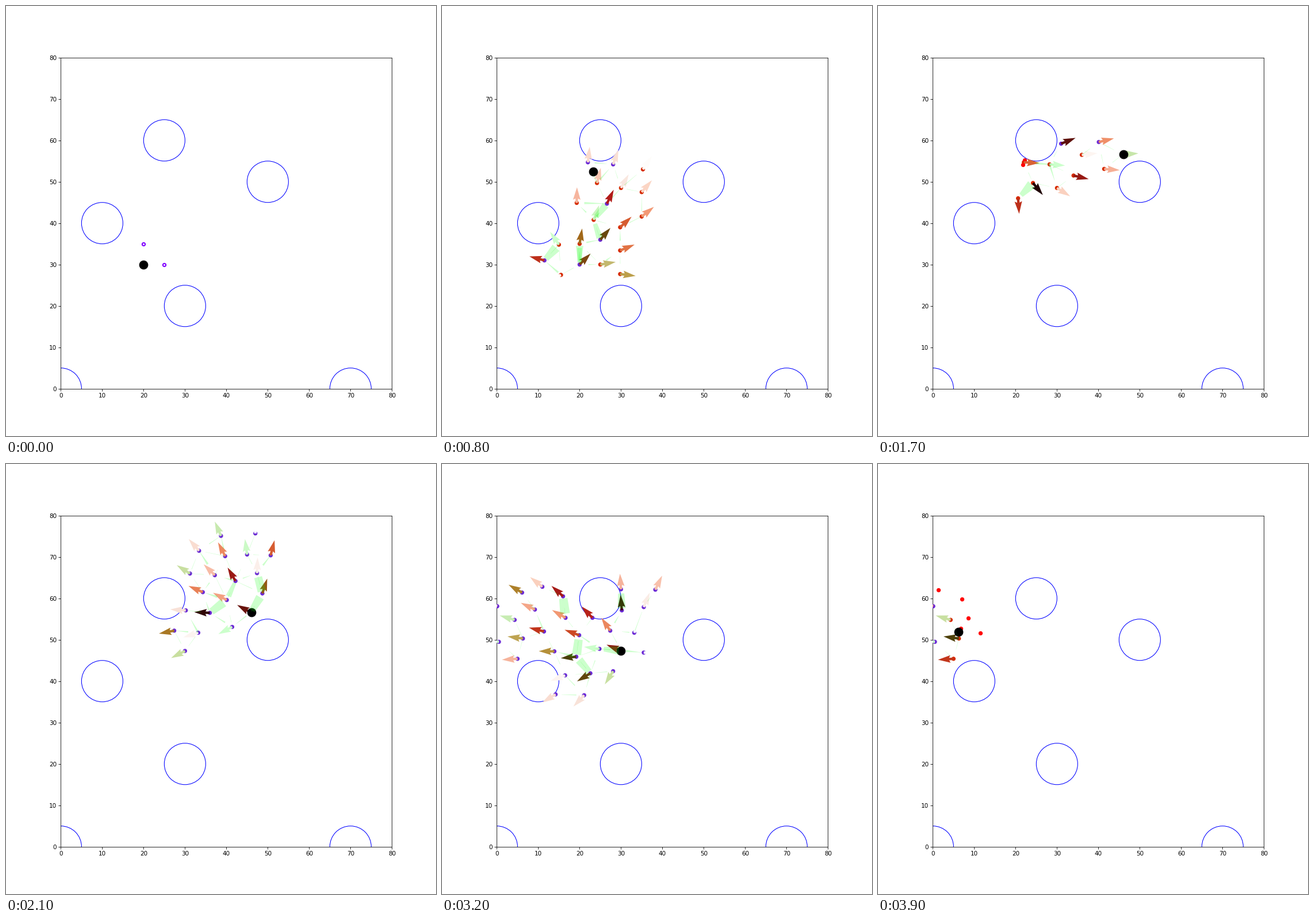
A matplotlib script that plays this animation: 748 by 748 pixels, repeating every 4 s.

```python
import itertools

import numpy as np
import matplotlib.pyplot as plt
from matplotlib.animation import FuncAnimation
from matplotlib.collections import PolyCollection
from matplotlib.colors import LinearSegmentedColormap

FRAMES, STEP = 40, 100
LIME = np.array([0, 1, 0])
HEAT = LinearSegmentedColormap.from_list("heat", [
    "#ffffff", "#f8e2d8", "#fbd5c4", "#f6b29a", "#f1946e", "#de6c3c",
    "#c63d1c", "#b01a18", "#84190f", "#540e0a", "#200404"])
RAINBOW = plt.get_cmap("rainbow")


def tint(color, amount):
    return (1 - amount) * np.array(color[:3]) + amount * LIME


def wedge(a, b, w0, w1):
    """Quadrilateral from a to b, w0 wide at its start and w1 at its end."""
    d = b - a
    n = np.array([-d[1], d[0]]) / np.hypot(*d) / 2
    return np.array([a + n * w0, b + n * w1, b - n * w1, a - n * w0])


def cooling(top, n):
    """Heat values falling from top to zero."""
    left = 1 - np.arange(n) / n
    return np.maximum(top * 1.08 * left ** 1.3 - .06, 0)


class Graph:
    """Nodes spread outwards from a root; the stay nodes outlive the leave nodes.

    Both lists run from hot to cold. Times: growth, fading, end of the rest.
    """

    def __init__(self, root, stay, leave, tops, times, gain, hue, seed):
        self.xy = np.vstack([stay, leave])
        n, self.keep = len(self.xy), len(stay)
        self.times, self.gain = times, gain
        self.counts = [0, n, n, self.keep, self.keep, 0]
        self.heat = np.r_[cooling(tops[0], len(stay)), cooling(tops[1], len(leave))]
        away = self.xy - root
        dist = np.hypot(*away.T)
        self.way = away / dist[:, None]
        self.order = np.argsort(dist)
        self.hue = hue(*self.xy.T, self.heat) * np.ones(n)
        rng = np.random.default_rng(seed)
        self.green = rng.random(n) < .3
        self.links = []
        for i, j in itertools.combinations(range(n), 2):
            start, size, width, chance = rng.random(4)
            if np.hypot(*(self.xy[i] - self.xy[j])) < 7.5 and chance < .62:
                if dist[i] > dist[j]:
                    i, j = j, i
                d = self.xy[j] - self.xy[i]
                a = self.xy[i] + d * start / 2
                b = a + d * (.25 + size / 2)
                self.links.append((i, j, wedge(a, b, .1 + .6 * width ** 4, .05)))
        # broad patches run from the hottest nodes to their nearest neighbours
        for i in np.argsort(-self.heat)[:5]:
            gaps = np.hypot(*(self.xy - self.xy[i]).T)
            j = np.argsort(gaps)[1]
            d = self.xy[j] - self.xy[i]
            shape = wedge(self.xy[i] + d * .1, self.xy[i] + d * .8,
                          *rng.uniform(.8, 2.5, 2))
            self.links.append((i, j, shape))

    def state(self, f):
        count = int(round(np.interp(f, self.times, self.counts)))
        fade = self.times[2] + 1
        alive = np.zeros(len(self.xy), bool)
        if f < fade:
            alive[self.order[:count]] = True
        else:
            alive[:count] = True
        fading = np.clip((f - fade + 1) / 3, 0, 1)
        heat = np.minimum(self.heat * (1 + (self.gain - 1) * fading), 1)
        arrows = np.array([tint(HEAT(h), .2 * g) for h, g in zip(heat, self.green)])
        dots = np.array([tint(RAINBOW(h * fading), .16) for h in self.hue])
        polys = [p for i, j, p in self.links if alive[i] and alive[j]]
        ids = np.flatnonzero(alive)
        return ids[np.argsort(heat[ids])], arrows, dots, polys


ring = np.linspace(2.9, 6.4, 9)
first = Graph(
    (19, 29),
    [(25, 36), (20, 30), (26.6, 44.7), (11.5, 31), (20, 35), (29.8, 39),
     (29.8, 33.4), (29.8, 27.7), (35, 41.6), (25, 30), (19.3, 44.9),
     (24.2, 49.7), (35, 47.5), (22, 54.7), (28.1, 54.2), (30, 48.5),
     (23.4, 40.8), (35.3, 53), (15.5, 27.5), (15, 34.8)],
    np.c_[21 + 16 * np.cos(ring), 30 + 7 * np.sin(ring)],
    (.8, .3), [0, 4, 5, 8, 8, 11], 1,
    lambda x, y, heat: (y < 54) & (heat < .6), 3)

second = Graph(
    (20, 54.8),
    [(24.2, 49.7), (31, 59.2), (34, 51.5), (20.6, 46), (22, 54.7),
     (40.1, 59.6), (41.4, 53.1), (30, 48.5), (45.9, 56.6), (36, 56.5),
     (28.2, 54.2)],
    [(31.3, 43.4), (35.6, 34.4), (16, 40.8), (38.7, 48.7), (45.1, 36),
     (21, 38.8), (25.5, 44.6), (44.4, 43.4), (17.3, 49.9), (12.1, 35.2),
     (17.9, 33.9), (49.3, 39.3), (31.4, 37.3), (40.6, 33.3), (32.6, 30.1),
     (36.4, 43.4), (26.7, 39.6), (40.7, 39.4), (27.4, 33.5)],
    (.75, .9), [8, 12, 12, 17, 18, 21], 1.34,
    lambda x, y, heat: y < 59, 8)

third = Graph(
    (47, 56),
    [(36, 56.5), (45.9, 56.6), (42.2, 64.2), (48.7, 61.2), (27.4, 52.2),
     (34.3, 61.5), (40.1, 59.6), (24.8, 47.8), (30, 47.3), (30.2, 57.1),
     (33.2, 51.7), (41.4, 53.1)],
    [(50.7, 70.4), (26.2, 66.5), (39.7, 70.2), (33.6, 77.3), (22.2, 70),
     (37.2, 65.6), (51.8, 78.9), (31.2, 66), (33.4, 71.5), (38.7, 75.1),
     (47.4, 66.1), (45, 70.6), (47, 75.7), (42.6, 79.2)],
    (.95, .55), [18, 22, 22, 27, 28, 31], 1,
    lambda x, y, heat: np.interp(y, [56.8, 57, 64, 66, 70.6, 71],
                                 [0, .38, .45, .66, .7, 1]), 5)

fourth = Graph(
    (31, 47),
    [(6.3, 50.3), (5, 45.4), (.1, 58.1), (4.3, 54.8), (.5, 49.5)],
    [(30.2, 57.1), (19.2, 45.9), (22.6, 41.9), (30, 47.4), (16, 60.5),
     (23.1, 55.3), (11.4, 52), (19.9, 51.1), (6.1, 61.4), (13.9, 47.2),
     (27.4, 52.2), (16.6, 55.3), (9.2, 57.3), (30, 62.2), (38.3, 62.1),
     (11, 62.8), (28.1, 42.4), (14.2, 36.8), (21.1, 36.6), (35.5, 57.9),
     (16.5, 41.4), (24.8, 47.8), (33.2, 51.7), (35.5, 46.9)],
    (.44, .92), [28, 32, 35, 39, 40, 41], 2.1,
    lambda x, y, heat: x > 1, 11)

GRAPHS = [first, second, third, fourth]

# first and last frame, then the red dots shown between them
STRAYS = [
    (7, 9, [(22.8, 52.8)]),
    (14, 19, [(22.2, 55.2), (21.8, 54.2)]),
    (24, 26, [(28, 71.5), (28, 70.7), (28, 69.2)]),
    (37, 39, [(1.4, 62.1), (7, 59.8), (8.5, 55.3), (11.5, 51.6), (6.7, 52.7)])]

STOPS = [0, 5, 8, 12, 17, 22, 25, 35, 39]
PATH_X = [20, 20, 23.25, 23.25, 46, 46, 29.9, 30, 6.2]
PATH_Y = [30, 30, 52.4, 52.4, 56.6, 56.6, 47.1, 47.4, 51.9]

fig, ax = plt.subplots(figsize=(10, 10), dpi=74.801)
ax.set(xlim=(0, 80), ylim=(0, 80), aspect="equal")
for center in [(25, 60), (50, 50), (10, 40), (30, 20), (0, 0), (70, 0)]:
    ax.add_patch(plt.Circle(center, 5, fill=False, ec="blue", lw=1))
agent = ax.scatter([20], [30], s=200, c="black", lw=1, zorder=5)
drawn = []


def draw_graph(graph, f):
    ids, arrows, dots, polys = graph.state(f)
    if len(ids) == 0:
        return
    x, y = graph.xy[ids].T
    u, v = graph.way[ids].T
    drawn.append(ax.scatter(x, y, s=36, c=dots[ids], lw=1, zorder=3))
    drawn.append(ax.quiver(x, y, u, v, color=arrows[ids], scale=21.3,
                           scale_units="width", width=.0075, zorder=4))
    drawn.append(ax.add_collection(
        PolyCollection(polys, facecolor=(0, 1, 0, .2), lw=0, zorder=6),
        autolim=False))


def update(f):
    while drawn:
        drawn.pop().remove()
    if f == 0:
        for size, color, lw in ((36, RAINBOW(0.), 1), (9, "white", 0)):
            drawn.append(ax.scatter([20, 25], [35, 30], s=size, color=[color],
                                    lw=lw, zorder=3))
    for graph in GRAPHS:
        draw_graph(graph, f)
    for start, end, points in STRAYS:
        if start <= f <= end:
            drawn.append(ax.scatter(*zip(*points), s=36, c="red", lw=1, zorder=3))
    agent.set_offsets([[np.interp(f, STOPS, PATH_X), np.interp(f, STOPS, PATH_Y)]])
    return [agent, *drawn]


anim = FuncAnimation(fig, update, frames=FRAMES, interval=STEP,
                     init_func=lambda: [agent], repeat=True, repeat_delay=0)
plt.show()
```
